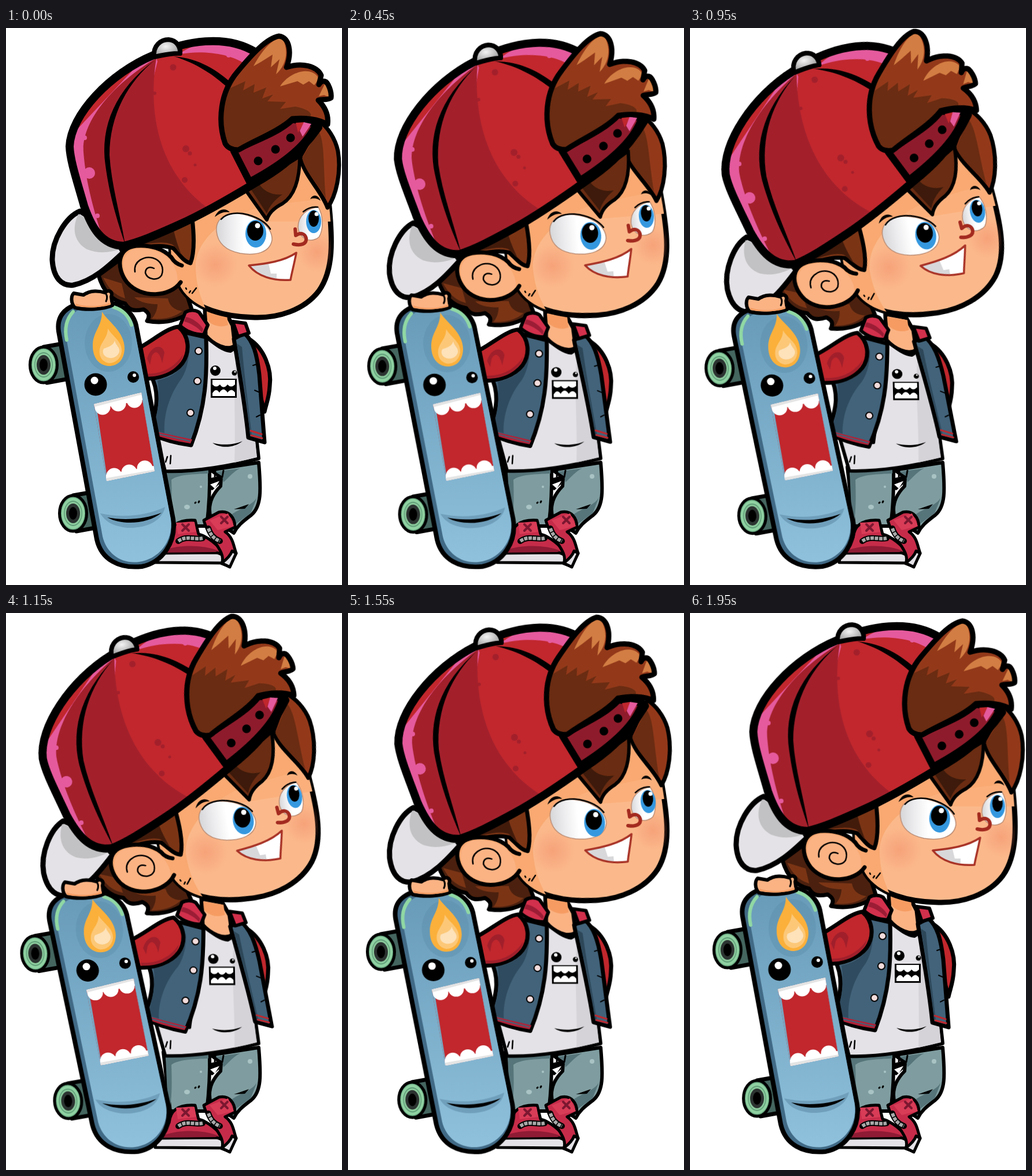
An HTML page without scripts that plays this animation: 581 by 964 pixels, repeating every 2 s.

```html
<!DOCTYPE html>
<html lang="en">
<head>
<meta charset="utf-8">
<title>Skater kid</title>
<style>
html, body { margin: 0; width: 100%; height: 100%; overflow: hidden; background: #fff; }
svg { display: block; width: 100%; height: 100%; }
.o { stroke: #000; stroke-width: 7; stroke-linejoin: round; stroke-linecap: round; }
.l { fill: none; stroke: #000; stroke-linecap: round; stroke-linejoin: round; }

/* every swaying part leans to its own --t and back */
.sway { animation: sway 2s infinite; }
.late { animation: late 2s infinite; }
@keyframes sway {
  0% { transform: none; animation-timing-function: cubic-bezier(.364,.06,.6,1); }
  50% { transform: var(--t); animation-timing-function: cubic-bezier(.4,0,.636,.97); }
  100% { transform: none; }
}
@keyframes late {
  0% { transform: none; animation-timing-function: cubic-bezier(.364,.06,.6,1); }
  56% { transform: var(--t); animation-timing-function: cubic-bezier(.4,0,.636,.97); }
  100% { transform: none; }
}
.head { --t: rotate(-9.6deg); transform-origin: 381px 518px; }
.nape { --t: rotate(-5.5deg); transform-origin: 381px 518px; }
.face { --t: translate(-4px, 5px); }
.torso { --t: skewX(1.43deg) scaleY(.963); transform-origin: 0 750px; }
.sleeve { --t: translate(-3px, 2px); }
.flapL { --t: translate(0, 3px) rotate(3.2deg); transform-origin: 335px 540px; }
.flapR { --t: translate(0, -3px) skewX(5deg); transform-origin: 0 555px; }
.board { --t: translate(-6.5px, 0) skewX(1.33deg) scaleY(.982); transform-origin: 0 935px; }
.art { --t: translate(0, -4px); }
.low { --t: translate(0, 3px); }
.hand { --t: translate(-16px, 7px); }
.tuft { animation: tuft 2s ease-in-out infinite; transform-origin: 400px 190px; }
.lock { animation: lock 2s ease-in-out infinite; }
.iris { animation: iris 2s linear infinite; }
.iris2 { animation: iris2 2s linear infinite; }
@keyframes tuft { 22% { transform: rotate(1.3deg); } 50% { transform: none; } 77% { transform: rotate(-1.2deg); } }
@keyframes lock { 23% { transform: translate(-6px, 1px); } 37% { transform: translate(-5px, 0); } 57%, 77% { transform: translate(2px, 0); } }
@keyframes iris { 10% { transform: translate(1.5px, 2px); } 23% { transform: translate(2px, 5px); } 57% { transform: translate(7px, 5px); } 77% { transform: translate(8px, 9px); } 97% { transform: none; } }
@keyframes iris2 { 57% { transform: translate(1px, -1px); } 77% { transform: translate(3px, 0); } 97% { transform: none; } }
</style>
</head>
<body>
<svg viewBox="0 0 581 964" preserveAspectRatio="none">
<defs>
  <linearGradient id="deck" x1="0" y1="0" x2="0" y2="1"><stop offset="0" stop-color="#689bb8"/><stop offset="1" stop-color="#8fc1dc"/></linearGradient>
  <linearGradient id="ball"><stop offset="0" stop-color="#d6d6d8"/><stop offset=".25" stop-color="#ececee"/><stop offset=".5" stop-color="#fff"/></linearGradient>
  <radialGradient id="blush"><stop offset="0" stop-color="#f0805f" stop-opacity=".4"/><stop offset="1" stop-color="#f0805f" stop-opacity="0"/></radialGradient>
  <radialGradient id="steel" cx=".45" cy=".4"><stop offset="0" stop-color="#f4f4f4"/><stop offset="1" stop-color="#a9a9a9"/></radialGradient>
  <path id="capShape" d="M110,205C112,150 180,78 255,47C310,22 380,10 432,42L470,100L540,172C500,228 460,252 428,270C385,296 340,322 300,340C260,358 230,371 203,377C165,376 148,345 135,308C122,262 111,230 110,205Z"/>
  <path id="faceShape" d="M557,290C566,370 566,420 541,455C515,489 470,502 430,501C380,500 325,487 303,450C290,425 278,390 290,345L430,262L545,200Z"/>
  <path id="tuftShape" d="M379,200C365,160 371,110 400,76C425,46 450,18 472,14C490,16 495,42 485,68C512,59 538,66 545,82L541,98C546,90 553,90 557,98C561,106 563,114 562,121C554,126 547,122 540,125C553,138 558,153 556,167C540,157 515,155 495,157C470,180 430,194 402,211C390,211 383,207 379,200Z"/>
  <path id="jaw" d="M152,651L234,631L257,767L174,784Z"/>
  <path id="laces" d="M298,888C312,878 326,886 340,883M350,866C354,878 360,884 370,888"/>
  <clipPath id="capClip"><use href="#capShape"/></clipPath>
  <clipPath id="faceClip"><use href="#faceShape"/></clipPath>
  <clipPath id="tuftClip"><use href="#tuftShape"/></clipPath>
  <clipPath id="jawClip"><use href="#jaw"/></clipPath>
  <g id="wheel">
    <path class="o" fill="#44665f" d="M0,-31L34,-37L44,24L6,31Z"/>
    <ellipse class="o" style="stroke-width:5" rx="23.500" ry="31" fill="#62a07b"/>
    <ellipse rx="20" ry="27" fill="#90d2a2"/>
    <ellipse rx="16" ry="22" fill="#5f9d78"/>
    <ellipse rx="14.500" ry="20" fill="#8ccb9d"/>
    <ellipse rx="12" ry="17" fill="#2c3331"/>
    <ellipse rx="7" ry="11"/>
  </g>
</defs>

<!-- back hair -->
<g class="sway nape">
  <path class="o" fill="#4b200e" d="M160,428C168,455 182,472 206,477C214,490 224,490 238,487C246,492 250,497 244,507C275,513 302,504 322,490L306,440L205,395Z"/>
  <path fill="#7b3515" d="M168,432C178,452 188,462 206,468L200,442ZM222,466C232,476 250,478 262,478C262,490 255,500 252,503C275,505 292,500 305,490C290,488 282,480 280,468Z"/>
</g>

<!-- legs and shoes -->
<path class="o" style="stroke-width:6" fill="#7f9da0" d="M272,760L352,760C353,800 351,830 347,862L284,862Z"/>
<path fill="#56757a" d="M276,768L350,764L350,771C325,772 296,773 286,782C287,810 287,835 284,855L280,855Z"/>
<path class="o" style="stroke-width:6" fill="#7f9da0" d="M354,765L437,752C441,800 442,828 424,843C408,855 400,862 394,874L354,848C349,830 352,812 371,793L372,778Z"/>
<path fill="#56757a" d="M434,812C426,828 400,832 385,846L392,862L423,840ZM362,768L405,762C392,768 384,780 376,786L374,776Z"/>
<path d="M350,780L372,774L368,790L357,800L350,798ZM394,833L420,824L413,832Z"/>
<path fill="#fff" d="M353,790L369,784L361,797Z"/>
<path class="l" stroke-width="3" d="M362,766L361,776M376,766L374,777M327,822L328,821M333,821L334,819"/>
<g fill="#a9c3c4"><ellipse cx="313" cy="829" rx="5" ry="4"/><circle cx="422" cy="776" r="4"/><circle cx="337" cy="794" r="2"/></g>
<g class="o" style="stroke-width:5">
  <path fill="#c62c49" d="M282,882C284,862 296,850 327,852L333,876C348,880 368,895 377,911L262,913Z"/>
  <path fill="#e4e2e6" d="M258,925L260,909L362,908C376,909 380,918 377,926Z"/>
  <path fill="#c62c49" d="M342,852L368,838C386,834 396,848 396,864L379,872C393,882 393,895 398,909L386,932L373,927C382,906 350,884 342,852Z"/>
  <path fill="#e4e2e6" d="M373,926C381,920 388,914 391,905L398,909L387,933Z"/>
</g>
<path fill="#d83c57" d="M294,856L326,855L329,872L297,876ZM352,852L384,840L394,862L366,869Z"/>
<path fill="#8f1b34" d="M272,904C300,894 340,894 368,905L362,907L270,908Z"/>
<path class="l" style="stroke:#7c1730" stroke-width="4" d="M305,859L316,870M316,859L305,870M372,846L383,857M383,846L372,857"/>
<use href="#laces" class="l" stroke-width="10"/>
<use href="#laces" class="l" style="stroke:#a9a9a9;stroke-linecap:butt" stroke-width="6" stroke-dasharray="6 1.500"/>

<!-- torso -->
<g class="sway torso">
  <path class="o" fill="#c1272d" d="M420,538C446,554 460,590 456,620C455,640 450,650 447,664L430,600Z"/>
  <path fill="#8f1d2a" d="M425,548C440,565 440,610 445,650L432,600Z"/>
  <path class="o" fill="#fbb384" d="M344,485L345,532C358,548 382,560 396,550L392,515L380,492Z"/>
  <path fill="#f69c62" d="M347,490L382,496L384,514C370,520 355,514 348,505Z"/>
  <path class="o" style="stroke-width:6" fill="#e4e2e6" d="M345,534C358,544 374,558 388,559C394,556 397,552 398,546L418,570L437,745C395,757 325,769 275,767L258,700L318,716Z"/>
  <path fill="#d5d3d8" d="M398,560C392,620 398,690 395,752L434,743L418,590Z"/>
  <path d="M357,718C375,723 395,721 409,715C395,727 370,728 357,718Z"/>
  <path class="l" stroke-width="2.500" d="M279,742L276,751M285,740L284,754"/>
  <circle cx="362" cy="593" r="9"/><circle cx="395" cy="597" r="4.500"/>
  <g fill="#fff"><circle cx="361" cy="589" r="3"/><circle cx="396" cy="595" r="1.500"/></g>
  <path d="M354,607H399V640H354Z"/>
  <path fill="#fff" d="M357,609H396L396,617Q389,624 383,617Q376,626 370,617Q363,624 357,617ZM357,637V632Q363,622 369,631Q376,620 383,631Q390,622 396,631V637Z"/>

  <g class="sway flapR">
    <path class="o" fill="#42637a" d="M394,538L412,528C428,542 434,565 438,600L447,717L419,709C414,655 404,600 394,538Z"/>
    <path fill="#2d4759" d="M399,546L408,552C413,610 420,660 425,706L422,704C418,650 408,600 399,546Z"/>
    <path class="l" style="stroke:#c1272d" stroke-width="3" d="M423,697L442,703M424,705L443,710"/>
    <path class="l" stroke-width="2" d="M433,582L427,584M437,630L430,627M439,670L433,673"/>
  </g>
  <g class="sway flapL">
    <path class="o" fill="#42637a" d="M306,526L346,535C348,600 346,655 320,722C290,718 266,710 247,701C262,660 266,630 250,600Z"/>
    <path fill="#2f4b5f" d="M310,575C300,598 280,606 262,610C267,640 262,670 254,696L274,701C272,670 282,635 304,606C314,590 318,565 316,545Z"/>
    <path fill="#b12237" d="M252,697L322,712L319,719C290,715 268,708 250,702Z"/>
    <path class="l" style="stroke:#42637a" stroke-width="2" d="M256,701L318,715"/>
    <g class="o" style="stroke-width:2" fill="#f3dcdc"><circle cx="333" cy="559" r="6"/><circle cx="331" cy="611" r="6"/><circle cx="319" cy="666" r="6"/></g>
  </g>
  <g class="sway sleeve">
    <path class="o" fill="#c1272d" d="M298,517C317,533 319,560 305,580C292,597 265,608 236,607L222,558C250,545 275,520 298,517Z"/>
    <path fill="#a01f2b" d="M244,572C250,550 270,545 274,562L270,580C266,560 258,556 252,568L249,583ZM240,598C265,600 290,590 306,565C302,590 270,606 240,603Z"/>
  </g>
  <path class="o" style="stroke-width:6" fill="#d2304c" d="M301,515L310,492C318,487 328,488 334,492L349,514L342,531C325,531 310,524 301,515Z"/>
  <path fill="#9b1d35" d="M308,508C318,510 332,518 339,527L341,521C334,510 322,502 311,500Z"/>
  <path class="o" style="stroke-width:6" fill="#d2304c" d="M392,508L414,511L420,528L401,534Z"/>
</g>

<!-- head -->
<g class="sway head">
  <path class="o" style="stroke-width:9" fill="#e4e2e6" d="M128,317C104,327 79,366 80,402C82,432 96,447 116,445C150,438 178,412 203,388L180,350Z"/>
  <path fill="#c2c1c3" d="M125,322C112,350 120,372 140,383C160,391 180,389 200,382L165,345Z"/>
  <use href="#faceShape" class="o" style="stroke-width:9" fill="#fbb98b"/>
  <g clip-path="url(#faceClip)">
    <path fill="#f9a971" d="M280,330L570,190V300C520,330 470,320 425,318C370,330 330,370 328,410C328,450 340,475 352,500L270,470Z"/>
    <path fill="#fbb07c" d="M400,325C440,300 520,305 565,290V335H400Z"/>
    <circle cx="362" cy="410" r="40" fill="url(#blush)"/><circle cx="538" cy="388" r="36" fill="url(#blush)"/>
  </g>

  <g class="sway face">
    <path fill="url(#ball)" stroke="#b98a72" stroke-width="1.500" d="M364,352C362,330 380,319 402,321C437,326 461,345 460,367C456,390 430,394 405,390C380,385 366,372 364,352Z"/>
    <path fill="url(#ball)" stroke="#b98a72" stroke-width="1.500" d="M505,345C505,325 520,312 540,310C549,325 549,350 541,362C530,372 508,368 505,345Z"/>
    <g class="iris">
      <ellipse cx="432" cy="356" rx="18" ry="24" fill="#3598df"/><ellipse cx="431" cy="351" rx="14" ry="17"/><circle cx="435" cy="342" r="4.500" fill="#fff"/>
    </g>
    <g class="iris2">
      <ellipse cx="532" cy="335" rx="13" ry="20" fill="#3598df"/><ellipse cx="532" cy="330" rx="9" ry="14"/><circle cx="537" cy="322" r="3.500" fill="#fff"/>
    </g>
    <path class="l" stroke-width="2.500" d="M372,331C382,319 402,319 418,323C435,328 450,337 457,348M514,318C521,312 530,309 539,310"/>
    <path d="M361,327C367,312 380,311 387,319C378,317 370,320 361,327ZM526,296C530,287 540,288 544,299C537,294 532,294 526,296Z"/>
    <path class="l" style="stroke:#a32a1f" stroke-width="6" d="M500,348L501,359C510,353 517,356 519,364C520,374 510,377 497,374"/>
    <path fill="#fff" d="M420,411C450,408 480,404 501,390C498,410 494,424 492,436C462,438 435,430 420,411Z"/>
    <path fill="#d8d8da" d="M420,411L454,408L458,425L468,425V434C445,434 430,425 420,411Z"/>
    <path class="l" style="stroke:#a83226" stroke-width="3.500" d="M492,436C462,438 435,430 420,411C450,408 480,404 502,389C498,410 494,424 492,436"/>
  </g>

  <path class="o" fill="#7b3515" d="M218,380L322,330C326,365 325,392 319,407C306,404 297,388 289,381C265,373 240,381 218,380Z"/>
  <path fill="#431b0b" d="M235,374L290,350C293,365 298,378 303,392C296,386 292,376 286,374C268,368 250,374 235,374Z"/>
  <path fill="#f9a971" d="M302,440C285,465 235,470 209,440C190,415 192,381 225,377C252,374 278,385 288,400L306,412L326,412L322,442Z"/>
  <path fill="#fbb384" d="M296,440C280,460 238,464 213,438C198,418 198,388 225,382C248,380 270,388 282,400C292,412 298,425 296,440Z"/>
  <path class="l" stroke-width="7" d="M304,411C297,409 290,404 286,397C272,382 250,375 225,377C192,381 190,415 209,440C235,470 285,465 302,440"/>
  <path class="l" stroke-width="2.500" d="M223,422C220,403 240,394 254,398C268,402 274,415 269,428C262,438 245,436 241,424C241,415 248,412 256,416M311,450L312,452M317,458L319,455M322,459L329,450"/>

  <g class="lock">
    <path class="o" fill="#93391a" d="M509,222C514,255 545,280 556,311C571,290 580,250 574,213C569,190 556,172 543,162Z"/>
    <path fill="#6a2c12" d="M512,225L540,178C552,195 548,240 553,295C540,270 518,250 512,225Z"/>
  </g>
  <path class="o" style="stroke-width:6" fill="#6a2c12" d="M414,280L451,332C455,318 466,310 478,304C500,290 508,260 508,222Z"/>
  <path fill="#3d1a0b" d="M424,280L451,321C455,308 466,296 478,288C460,290 445,282 438,270Z"/>

  <use href="#capShape" fill="#c1272d"/>
  <g clip-path="url(#capClip)">
    <path fill="#e55a9d" d="M100,200L255,35L262,58L180,385L100,330ZM298,46C335,18 390,14 440,46L413,62C385,43 335,38 298,46Z"/>
    <path fill="#a3202b" d="M260,52C249,120 255,200 300,262C312,280 330,298 352,314L200,385H175C155,330 138,270 134,215C130,165 180,100 260,52Z"/>
    <g fill="#e55a9d"><circle cx="144" cy="251" r="10"/><circle cx="158" cy="325" r="4"/><circle cx="136" cy="190" r="4"/><circle cx="385" cy="47" r="4"/></g>
    <g fill="#a3202b"><circle cx="289" cy="68" r="5.500"/><circle cx="311" cy="209" r="6"/><circle cx="318" cy="217" r="3.500"/><circle cx="327" cy="237" r="2.500"/><circle cx="257" cy="113" r="3"/><circle cx="309" cy="263" r="5"/></g>
    <path d="M257,56C190,105 162,170 172,238C179,290 191,330 206,374C197,320 182,270 179,220C179,150 212,92 257,56ZM290,49C335,53 365,73 392,97L383,103C360,82 330,61 290,49Z"/>
  </g>
  <use href="#capShape" class="l" stroke-width="14"/>
  <path class="o" style="stroke-width:12" fill="#8e1b2b" d="M394,213C425,195 465,185 495,158L536,166C520,205 470,240 421,266Z"/>
  <path fill="#c1272d" d="M501,164L516,163L505,181Z"/><path fill="#e55a9d" d="M515,163L528,166L513,188L508,178Z"/>
  <circle cx="436" cy="230" r="7.500"/><circle cx="466" cy="210" r="7.500"/><circle cx="492" cy="190" r="7.500"/>
  <path class="o" style="stroke-width:8" fill="url(#steel)" d="M256,50C254,30 268,20 281,20C296,21 302,34 301,44C286,43 272,47 256,50Z"/>

  <g class="tuft">
    <use href="#tuftShape" fill="#6a2c12"/>
    <g clip-path="url(#tuftClip)">
      <path fill="#93391a" d="M388,104C410,62 440,25 475,10L500,60L570,80V175L525,155C532,148 522,140 500,136L474,140L484,128L452,127L462,115L443,122L450,103L428,112L430,97L410,108L414,92Z"/>
      <path fill="#d27d43" d="M428,66C445,34 465,15 478,18C490,40 484,65 467,80L473,54L458,68L461,46L442,58ZM474,101C490,75 530,64 541,88L533,99L524,92L514,98L504,92ZM541,118L552,95L564,122L550,116Z"/>
    </g>
    <use href="#tuftShape" class="l" stroke-width="9"/>
  </g>
</g>

<!-- skateboard -->
<g class="late board">
  <use href="#wheel" x="65" y="583"/>
  <g class="late low"><use href="#wheel" x="116" y="840"/></g>
  <path class="o" style="stroke-width:8" fill="#416a86" d="M91,525C86,490 115,475 150,474C195,471 222,490 226,520L289,850C295,890 270,925 235,932C195,936 165,920 157,885Z"/>
  <path fill="url(#deck)" d="M103,530C98,500 125,482 155,480C195,477 218,495 222,520L285,850C290,890 262,920 230,924C200,928 174,910 167,880Z"/>
  <path class="l" style="stroke:#90d8a4" stroke-width="6" d="M105,540C100,517 106,502 116,491M186,483C203,488 212,498 217,514"/>
  <path fill="#6f9fbb" d="M163,840C200,848 240,845 275,829C270,855 240,866 210,865C185,862 172,855 163,840Z"/>
  <path d="M175,847C205,853 240,850 269,839C245,859 200,861 175,847Z"/>
  <g class="late art">
    <ellipse cx="177" cy="545" rx="41" ry="50" fill="#5c8eab" opacity=".45"/>
    <path fill="#fbb03b" d="M166,491C176,508 205,525 205,555C204,576 192,585 178,585C160,584 150,570 150,550C150,525 166,517 166,491Z"/>
    <path fill="#fcc878" d="M176,520C185,535 201,542 200,560C198,574 188,580 178,580C166,578 160,568 162,556C165,542 176,536 176,520Z"/>
    <path fill="#fde2ba" d="M188,541C190,550 197,552 196,560C194,568 186,572 179,571C170,570 165,562 169,555C176,552 186,550 188,541Z"/>
    <circle cx="155" cy="617" r="19.500"/><circle cx="220" cy="604" r="10"/>
    <g fill="#fff"><circle cx="153" cy="610" r="6.500"/><circle cx="222" cy="601" r="3"/></g>
    <use href="#jaw" fill="#c1272d"/>
    <g clip-path="url(#jawClip)">
      <path fill="#77a9c5" d="M150,650L158,665L176,786L168,786ZM234,625L260,770L257,768L236,645Z"/>
      <path fill="#fff" d="M150,645L236,625L239,643L155,660ZM170,790L173,773L260,757V772Z"/>
      <g fill="#fff"><circle cx="167" cy="656" r="13.500"/><circle cx="194" cy="650" r="13.500"/><circle cx="222" cy="644" r="13.500"/><circle cx="187" cy="775" r="13.500"/><circle cx="213" cy="769" r="13.500"/><circle cx="240" cy="762" r="13.500"/></g>
      <path fill="#e4e4e4" d="M150,648L236,628V634L152,656ZM172,786L258,769V764L173,779Z"/>
    </g>
  </g>
</g>

<g class="sway hand">
  <path class="o" style="stroke-width:6" fill="#fbb384" d="M119,484C112,476 112,464 117,459L134,462C146,453 162,455 171,458C178,452 185,456 182,465L184,480C168,487 140,489 119,484Z"/>
  <path fill="#f69c62" d="M120,477C140,484 165,482 181,475L181,479C165,484 140,485 121,481Z"/>
  <path class="l" stroke-width="3" d="M171,458C176,462 175,469 173,473M134,462L141,460"/>
</g>
</svg>
</body>
</html>
```
